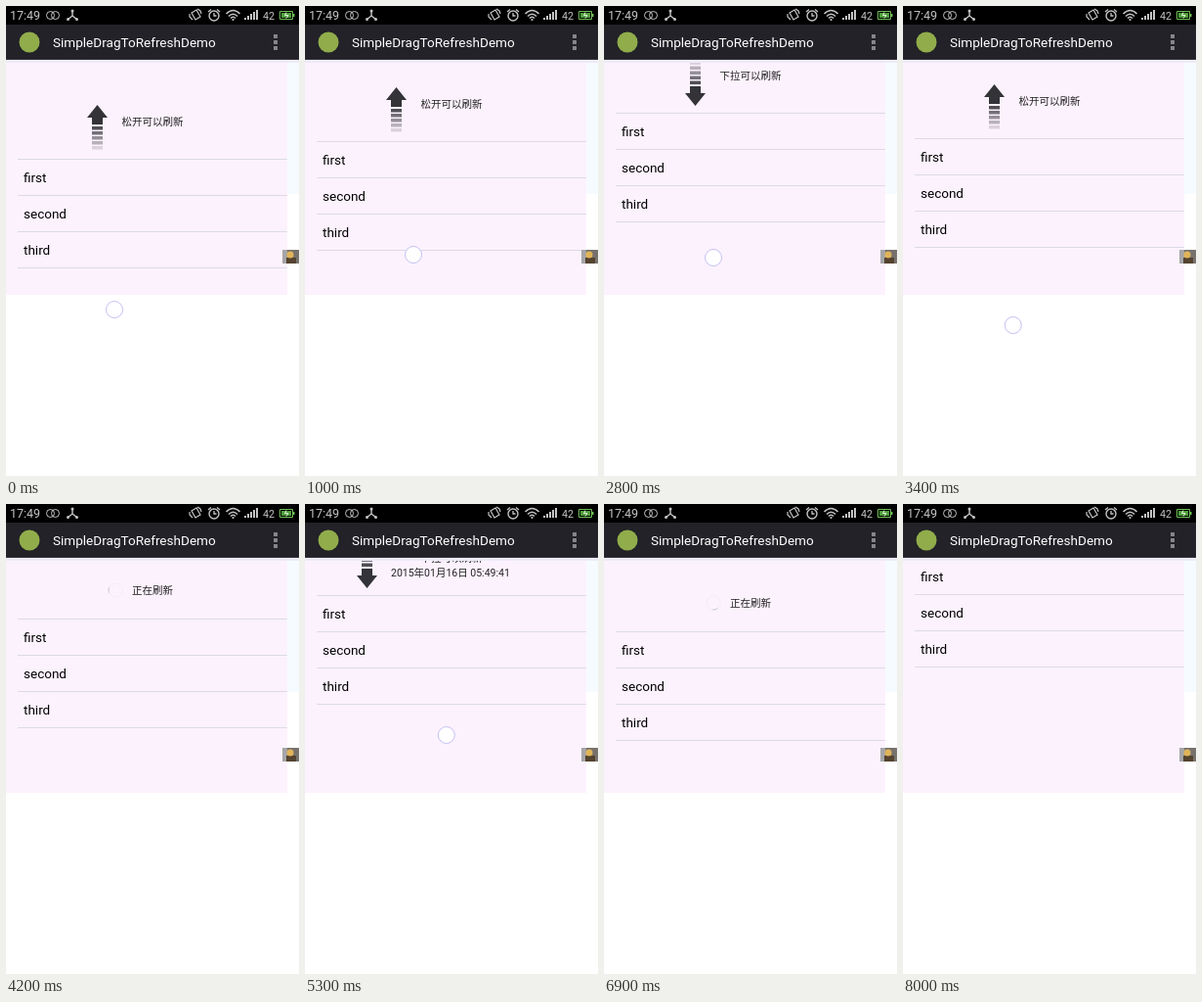
Write an HTML page with a canvas that moves like this. It is 300 px wide and 480 px high and loops after 8.2 s.

```html
<!DOCTYPE html>
<html lang="zh">
<head>
<meta charset="utf-8">
<title>Drag to refresh</title>
<style>
html, body { margin: 0; width: 300px; height: 480px; overflow: hidden; background: #fff; }
canvas { display: block; }
</style>
</head>
<body>
<canvas id="stage" width="300" height="480"></canvas>
<script>
const ctx = document.getElementById('stage').getContext('2d');
const LOOP = 8200, STEP = 100, TAU = Math.PI * 2;
const FONT = 'Roboto, "Noto Sans CJK SC", "Noto Sans CJK", sans-serif';
const TOP = 55, ROW = 37;

// [time, value, value, ...]
const PULL = [[0, 101], [1000, 83], [2000, 28], [2800, 54], [3600, 88], [4200, 62], [4700, 62],
  [5000, 0], [5100, 0], [5600, 96], [6100, 105], [6500, 105], [7400, 62], [7700, 62], [8000, 0]];
const TOUCH = [[0, 111, 310], [1000, 111, 254], [2000, 107, 219], [2800, 112, 257], [3600, 113, 349],
  [5100, 140, 160], [5600, 152, 350], [6100, 155, 377]];
const SETTLES = [3600, 6500];

function sample(track, t) {
  const i = track.findIndex(key => key[0] > t);
  if (i < 0) return track[track.length - 1].slice(1);
  const a = track[i - 1], b = track[i];
  let k = (t - a[0]) / (b[0] - a[0]);
  if (track === PULL && SETTLES.includes(a[0])) k = 1 - (1 - k) ** 2;
  return a.slice(1).map((v, j) => v + (b[j + 1] - v) * k);
}

function rect(x, y, w, h, color) {
  ctx.fillStyle = color;
  ctx.fillRect(x, y, w, h);
}

function label(str, x, y, size, color) {
  ctx.font = `${size}px ${FONT}`;
  ctx.fillStyle = color;
  ctx.textBaseline = 'alphabetic';
  ctx.fillText(str, x, Math.round(y + size * 0.36));
}

function stroke(path, color, width = 1) {
  ctx.strokeStyle = color;
  ctx.lineWidth = width;
  ctx.stroke(new Path2D(path));
}

function disc(x, y, r, fill, line, width = 1) {
  ctx.beginPath();
  ctx.arc(x, y, r, 0, TAU);
  if (fill) { ctx.fillStyle = fill; ctx.fill(); }
  if (line) { ctx.strokeStyle = line; ctx.lineWidth = width; ctx.stroke(); }
}

function arrow(x, y, turn) {
  ctx.save();
  ctx.translate(x, y);
  ctx.rotate(Math.PI * (1 - turn));
  ctx.fillStyle = '#333338';
  ctx.fill(new Path2D('M0-24L10.500-11H5.500V-4H-5.500V-11H-10.500Z'));
  for (let i = 0; i < 5; i++) {
    ctx.globalAlpha = 0.85 - i * 0.17;
    ctx.fillRect(-5.5, -2 + i * 5, 11, 3.5);
  }
  ctx.restore();
}

function spinner(x, y, angle) {
  disc(x, y, 7, null, '#f1edf5');
  ctx.beginPath();
  ctx.arc(x, y, 7, angle, angle + 0.8);
  ctx.strokeStyle = '#c9c9d8';
  ctx.stroke();
}

function header(t, y) {
  const first = t >= 3700 && t < 4700;
  if (first || (t >= 6500 && t < 7700)) {
    const spin = Math.min(t, first ? 4400 : 7500);
    spinner(112, y + 26, 2.75 + (spin - 4200) / 1000 * TAU);
    label('正在刷新', 129, y + 26, 10.5, '#222');
    return;
  }
  const dated = t >= 4700;
  const turn = Math.min(1, Math.max(0, (y - 63) / 6));
  arrow(dated ? 63.5 : 93.5, y + 24, turn);
  label(turn > 0.2 ? '松开可以刷新' : '下拉可以刷新', 118.5, y + 17, 10.5, '#222');
  if (dated) label('2015年01月16日 05:49:41', 88, y + 32, 10.5, '#222');
}

function list(pull) {
  const y = TOP + pull;
  for (let i = 0; i < 4; i++) rect(12, y + i * ROW, 276, 1, '#dcdae8');
  ['first', 'second', 'third'].forEach((name, i) =>
    label(name, 18, y + 19.3 + i * ROW, 13.5, '#000'));
}

function statusBar() {
  const grey = '#c4c4c4';
  rect(0, 0, 300, 19, '#000');
  label('17:49', 4, 9.5, 12.5, grey);
  disc(45.5, 9.5, 4, null, grey);
  disc(50.5, 9.5, 4, null, grey);
  stroke('M68 4V10L63 14M68 10L73 14', grey, 1.4);
  [[68, 5], [63.5, 13.5], [72.5, 13.5]].forEach(([x, y]) => disc(x, y, 1.5, grey));
  stroke('M190 7L195 4L199 11L194 14ZM188 8V11L191 14M196 3L199 5L200 8', grey, 1.2);
  disc(213, 10, 5, null, grey, 1.4);
  stroke('M213 7V10H215.500M207 6L210 3.500M216 3.500L219 6', grey, 1.3);
  stroke('M225.500 8Q232.500 1 239.500 8M228 10.500Q232.500 6 237 10.500M230 12.500Q232.500 10 235 12.500', grey, 1.5);
  disc(232.5, 14, 1.1, grey);
  for (let i = 0; i < 5; i++) rect(244 + i * 3, 12 - i * 2, 2, 2 + i * 2, grey);
  label('42', 263, 9.7, 10.7, grey);
  stroke('M280.500 5.500H293.500V13.500H280.500Z', '#6fbf55');
  rect(282, 7, 10, 5, '#4f9f3c');
  rect(294, 8, 1.5, 3, '#6fbf55');
  stroke('M287 6.500L285.500 9.500H289L287 12.500', '#e4f5dc');
}

function actionBar() {
  rect(0, 19, 300, 36, '#222228');
  rect(0, 54, 300, 1, '#34343c');
  rect(0, 55, 300, 3, '#eeebfa');
  disc(24, 37, 10.5, '#91ad4b');
  label('SimpleDragToRefreshDemo', 48, 37.2, 13.55, '#fff');
  [29, 35, 41].forEach(y => rect(274, y, 4, 4, '#85858a'));
}

function thumbnail() {
  rect(283, 249, 17, 14, '#77716c');
  rect(283, 249, 5, 14, '#a5a5a8');
  rect(287, 257, 10, 6, '#54432f');
  disc(291, 254, 3.5, '#e0b458');
}

function draw(time) {
  const t = Math.floor(time % LOOP / STEP) * STEP;
  const pull = Math.round(sample(PULL, t)[0]);
  rect(0, 0, 300, 480, '#fff');
  rect(0, TOP, 288, 240, '#fcf2fd');
  rect(288, TOP, 12, 137, '#f6fbff');
  header(t, pull);
  list(pull);
  actionBar();
  statusBar();
  thumbnail();
  if (t <= 3600 || (t >= 5100 && t < 6500)) {
    const [x, y] = sample(TOUCH, t);
    disc(x, y, 8.5, '#fff', '#c4c0f2');
  }
}

let start;
function tick(now) {
  start ??= now;
  draw(now - start);
  requestAnimationFrame(tick);
}
draw(0);
requestAnimationFrame(tick);
</script>
</body>
</html>
```
